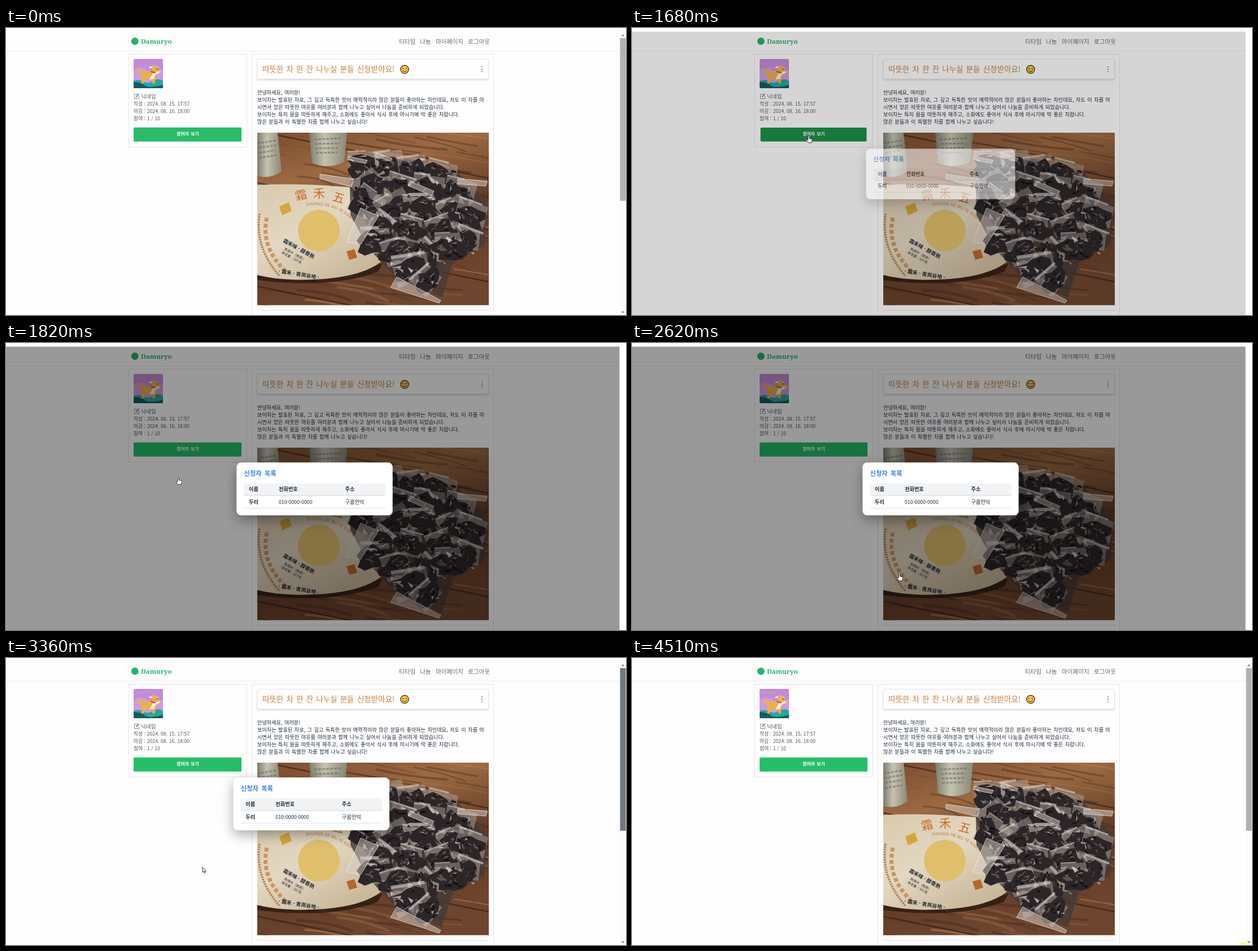
An HTML page that plays this animation: 1098 px wide and 510 px high, repeating every 4.58 s.

```html
<!DOCTYPE html>
<html lang="ko">
<head>
<meta charset="utf-8">
<title>나눔</title>
<style>
  html, body { margin: 0; width: 100%; height: 100%; overflow: hidden; background: #fefefe; }
  svg { display: block; width: 1098px; height: 510px; }
  text { font-family: "Noto Sans CJK KR", "Noto Sans CJK JP", sans-serif; fill: #212934; }
  .nav { font-size: 10.6px; fill: #6b6864; }
  .meta { font-size: 8.7px; word-spacing: .2px; fill: #55575b; }
  .body { font-size: 9.12px; word-spacing: 1px; fill: #1f2a3a; }
  .cell { font-size: 9.2px; }
  .bold { font-weight: 700; }
  .brand { font: 700 11.5px "Noto Serif", serif; fill: #28b16a; }
  .title { font-size: 13.5px; font-weight: 500; word-spacing: 1.4px; fill: #cf9560; stroke: #cf9560; stroke-width: .25px; }
  .label { font-size: 7.9px; font-weight: 700; word-spacing: 1px; fill: #fff; text-anchor: middle; }
  .heading { font-size: 11.3px; font-weight: 700; word-spacing: 2px; fill: #3a82e2; }
  .stamp { font-size: 21px; fill: #c86a2c; }
  .box { fill: #fefefe; stroke: #e6e6e6; }
  .raised { filter: drop-shadow(0 2px 1.5px #0002); }
  .floating { filter: drop-shadow(0 8px 11px #0005); }
  #press { transform-origin: 322px 189px; }
</style>
</head>
<body>
<svg viewBox="0 0 1098 510">
  <defs>
    <clipPath id="frame"><rect x="445" y="186" width="410" height="306.5"/></clipPath>
    <clipPath id="portrait"><rect x="226" y="55" width="52" height="52" rx="2"/></clipPath>
    <linearGradient id="wood" x2=".35" y2="1">
      <stop stop-color="#7a4c30"/><stop offset=".3" stop-color="#9c6a42"/>
      <stop offset=".65" stop-color="#5f3a27"/><stop offset="1" stop-color="#6e452e"/>
    </linearGradient>
    <linearGradient id="tin">
      <stop stop-color="#7c7d70"/><stop offset=".4" stop-color="#c6c2b0"/><stop offset="1" stop-color="#8a8776"/>
    </linearGradient>
    <linearGradient id="paper" x2=".7" y2="1">
      <stop stop-color="#d9c9ac"/><stop offset=".5" stop-color="#e3d7c2"/><stop offset="1" stop-color="#c9b799"/>
    </linearGradient>
    <path id="arc" d="M531 316Q588 308 627 357"/>
  </defs>

  <rect width="1098" height="510" fill="#fefefe"/>
  <path d="M0 41H1087" stroke="#ececec"/>
  <circle cx="228.3" cy="23.5" r="6.5" fill="#28b16a"/>
  <text class="brand" x="239" y="27.8">Damuryo</text>
  <text class="nav" x="696" y="27.6">티타임</text>
  <text class="nav" x="733" y="27.6">나눔</text>
  <text class="nav" x="761" y="27.6">마이페이지</text>
  <text class="nav" x="818" y="27.6">로그아웃</text>

  <rect class="box" x="217" y="46.5" width="209.5" height="165"/>
  <g clip-path="url(#portrait)">
    <path d="M226 55h52v52h-52z" fill="#c48bd8"/>
    <path d="M226 74q14-7 25 1t27-3v30h-52z" fill="#d09be0"/>
    <path d="M253 71q2-4 5-2 3-5 7 0 5-1 5 2z" fill="#fff"/>
    <path d="M226 94q9-4 17 1t18-1 17 0v14h-52z" fill="#2aa79b"/>
    <path d="M226 96q14 0 20 6t32-1v7h-52z" fill="#155969"/>
    <g transform="translate(249 88)scale(1.2)translate(-249 -88)">
      <path d="M240 82q-7-1-4-8 3 3 7 5l13-1 2-9 4 3 3-2 1 6 5 2-3 4-4 1-2 6-1 8h-3l-1-6-9-1-4 7h-3l1-8z" fill="#eab04a"/>
      <path d="M258 82l7-3h5l-3 3-5 2-2 6-7 1z" fill="#fff1d4"/>
      <path d="M255 79l7 2" stroke="#d1484a" stroke-width="2"/>
      <circle cx="264.5" cy="75.5" r=".8" fill="#333"/>
    </g>
  </g>
  <path d="M233 117.5h-5.5v8h8v-4.5" fill="none" stroke="#8a9199"/>
  <path d="M230.5 122.5l5-5.5" stroke="#6f8fb4" stroke-width="2"/>
  <text class="meta" x="239" y="125" style="font-size:9.6px">닉네임</text>
  <text class="meta" x="226" y="138">작성 : 2024. 08. 15. 17:57</text>
  <text class="meta" x="226" y="151">마감 : 2024. 08. 16. 18:00</text>
  <text class="meta" x="226" y="164">참여 : 1 / 10</text>
  <g id="press">
    <rect x="226" y="176.7" width="191" height="25" rx="1.5" fill="#26bd69"/>
    <rect id="hover" x="226" y="176.7" width="191" height="25" rx="1.5" fill="#1a9147"/>
    <text class="label" x="322" y="191.3">참여자 보기</text>
  </g>

  <rect class="box" x="435.5" y="46.5" width="428" height="480"/>
  <rect class="box raised" x="445" y="55.5" width="409.5" height="35" rx="2"/>
  <text class="title" x="454" y="78.3">따뜻한 차 한 잔 나누실 분들 신청받아요!</text>
  <g fill="none" stroke="#292520" stroke-linecap="round">
    <circle cx="706" cy="73.5" r="7.2" fill="#fbc743" stroke-width="1.2"/>
    <path d="M701.5 72.5q1.5-2.500 3 0m3 0q1.5-2.500 3 0M702 75.5q4 4.500 8 0"/>
  </g>
  <path d="M843 69v0m0 4.2v0m0 4.2v0" stroke="#888" stroke-width="2.2" stroke-linecap="round"/>
  <text class="body" x="445" y="118">안녕하세요, 여러분!</text>
  <text class="body" x="445" y="131">보이차는 발효된 차로, 그 깊고 독특한 맛이 매력적이라 많은 분들이 좋아하는 차인데요, 저도 이 차를 마</text>
  <text class="body" x="445" y="144">시면서 얻은 따뜻한 여유를 여러분과 함께 나누고 싶어서 나눔을 준비하게 되었습니다.</text>
  <text class="body" x="445" y="157">보이차는 특히 몸을 따뜻하게 해주고, 소화에도 좋아서 식사 후에 마시기에 딱 좋은 차랍니다.</text>
  <text class="body" x="445" y="170">많은 분들과 이 특별한 차를 함께 나누고 싶습니다!</text>

  <g clip-path="url(#frame)">
    <path d="M445 186h410v307H445z" fill="url(#wood)"/>
    <g id="grain" fill="none"></g>
    <path d="M445 186h36l7 69q-20 14-43 8z" fill="url(#tin)"/>
    <path d="M537 186h67l-5 52q-28 14-57 2z" fill="url(#tin)"/>
    <path d="M445 205l33-5m-31 13l32-5m-31 14l30-5m-30 14l31-5M546 198l47-2m-46 10l44-1m-43 9l42-1m-41 9l38-1" stroke="#66695d" stroke-width="3" stroke-dasharray="5 2" opacity=".55"/>
    <path d="M445 430q110 30 222-12l-8 15q-80 31-214 15z" fill="#2b1a11" opacity=".8"/>
    <path d="M445 279q70-4 164 4l14 42q30 40 40 91-30 24-100 30-70 5-118-7z" fill="url(#paper)"/>
    <circle cx="554" cy="360" r="37" fill="#dfbf6c"/>
    <path d="M484 317l17-7 5 15-17 8z" fill="#d6a63d"/>
    <path d="M603 397l14-4 5 15-14 4z" fill="#b8662f"/>
    <path d="M462 337Q450 390 497 434" fill="none" stroke="#cb9560" stroke-width="7" stroke-dasharray="7 4"/>
    <path d="M449 330Q440 390 484 440" fill="none" stroke="#b68452" stroke-width="4" stroke-dasharray="3 1.5"/>
    <text class="stamp" transform="translate(514 307)rotate(-14)">霜</text>
    <text class="stamp" transform="translate(544 301)">禾</text>
    <text class="stamp" transform="translate(577 306)rotate(16)">五</text>
    <text font-size="7.5" style="fill:#b98042"><textPath href="#arc">SHUANG HE WU YE XIAN CHA</textPath></text>
    <text class="bold" transform="translate(490 380)rotate(29)" font-size="9">霜禾味 · 醇香熟</text>
    <text transform="translate(492 394)rotate(29)" font-size="6">熟茶叶（熟茶）</text>
    <text transform="translate(487 400)rotate(29)" font-size="6">净含量：357克</text>
    <text class="bold" transform="translate(482 435)rotate(9)" font-size="9">· 霜禾 · 青岚谷地 ·</text>
    <path d="M608 240l55-14 75 10 62 20 52 60-5 70-55 30-20 62-70-24-60-62-32-60z" fill="#443a37" opacity=".8"/>
    <g id="bags"></g>
    <g fill="#d8d0c8" fill-opacity=".5" stroke="#f2eeea" stroke-opacity=".7">
      <path d="M628 320l32 14-32 51-25-5zM692 442l78 42-3 5-86-28zM556 260l60 8-4 14-56-14z"/>
      <path d="M606 228l34 7-3 6-33-7zM656 222l28 10-3 5-28-9zM716 272l42 18-4 8-42-18zM800 268l52 4-2 9-50-4z"/>
    </g>
  </g>
  <path d="M445 501.5H855" stroke="#eadfe0"/>

  <g id="scrollbar">
    <rect x="1087" width="11" height="510" fill="#fbfbfb"/>
    <rect id="thumb" x="1087.5" y="18" width="10" height="289"/>
    <path d="M1089.5 14.5l3-3.5 3 3.5zM1089.5 503.5l3 3.5 3-3.5z" fill="#8b8b8b"/>
  </g>
  <rect id="shade" y="6.5" width="1086.5" height="504"/>

  <g id="modal">
    <rect class="floating" x="408.3" y="212.3" width="276.4" height="94" rx="8" fill="#fff"/>
    <text class="heading" x="421.5" y="236.2">신청자 목록</text>
    <path d="M422 249.5h250v21h-250z" fill="#f1f3f5"/>
    <path d="M422 271h250" stroke="#cfd4da"/>
    <path d="M422 293.5h250" stroke="#dee2e6"/>
    <text class="cell bold" x="430" y="263.2">이름</text>
    <text class="cell bold" x="483" y="263.2">전화번호</text>
    <text class="cell bold" x="600.5" y="263.2">주소</text>
    <text class="cell bold" x="430" y="285.5">두리</text>
    <text class="cell" x="483" y="285.5" style="font-size:8.75px">010-0000-0000</text>
    <text class="cell" x="600.5" y="285.5">구름언덕</text>
  </g>

  <g id="pointer">
    <circle id="click" r="9" fill="#ff0" opacity=".6"/>
    <g fill="#fff" stroke="#222" stroke-width=".9" stroke-linejoin="round">
      <path id="hand" d="M-1.2 1q1.2-2 2.4 0v4l4 .8q1.2.5.9 2.7l-1.2 4H-.8L-4.4 8q0-2 3.2 0z"/>
      <path id="arrow" d="M0 0v9l2-1.8 1.5 3.3 1.5-.7-1.4-3h2.8z"/>
    </g>
  </g>
</svg>
<script>
const $ = id => document.getElementById(id);

let seed = 11;
const rand = (a, b) => {
  seed = seed * 16807 % 2147483647;
  return a + (b - a) * seed / 2147483647;
};
const times = (n, make) => Array.from({ length: n }, (_, i) => make(i)).join('');

$('grain').innerHTML = times(110, i => {
  const y = rand(160, 500), x = rand(420, 800);
  return `<path d="M${x} ${y}q60 ${rand(2, 14)} ${rand(70, 150)} ${rand(10, 30)}"
    stroke="${i % 3 ? '#3d2417' : '#c08a58'}" stroke-width="${rand(.6, 5)}" opacity="${rand(.12, .45)}"/>`;
}) + times(4, i => `<path d="M430 ${180 + i * 92}l440 90" stroke="#2e1a10" stroke-width="2.5" opacity=".6"/>`);

// A clear zip bag holding a dark lump of tea
function bag(x, y) {
  const lump = times(15, i => {
    const angle = i / 15 * Math.PI * 2, r = rand(17, 33);
    return `${Math.cos(angle) * r * 1.15},${Math.sin(angle) * r * .8 + 2} `;
  });
  const crumbs = times(16, i => `<path d="M${rand(-24, 18)} ${rand(-16, 18)}l${rand(2, 9)} ${rand(-6, 6)}"
    stroke="${i % 2 ? '#5d5350' : '#171214'}" stroke-width="${rand(1, 4)}"/>`);
  const shine = times(6, () => `<path d="M${rand(-30, 22)} ${rand(-24, 22)}l${rand(4, 16)} ${rand(-9, 9)} ${rand(-9, 3)} ${rand(1, 6)}z"
    fill="#e4dfdc" opacity="${rand(.25, .75)}"/>`);
  return `<g transform="translate(${x} ${y})rotate(${rand(-40, 50)})scale(${rand(.85, 1.15)})">
    <path d="M-27-24L${rand(16, 30)}-27 30 ${rand(8, 24)} -22 26z" fill="#b5aaa4" opacity=".45"/>
    <polygon points="${lump}" fill="#2c2628"/>${crumbs}${shine}
    <path d="M-27-25L${rand(0, 28)}-27" stroke="#d6d0cc" stroke-width="${rand(1, 6)}" opacity=".65"/></g>`;
}
const bagSpots = [632,246, 680,245, 722,255, 768,264, 645,282, 695,284, 745,288, 800,294,
  638,314, 688,322, 740,322, 790,325, 820,335, 664,352, 715,358, 770,358, 815,378,
  654,382, 690,398, 740,402, 785,390, 715,432, 745,450];
$('bags').innerHTML = times(bagSpots.length / 2, i => bag(bagSpots[2 * i], bagSpots[2 * i + 1]));

// time, x, y of the pointer tip
const route = [
  [590, 1040, 470], [800, 620, 300], [1000, 350, 205], [1140, 315, 190], [1480, 314, 191],
  [1680, 313, 191], [1820, 305, 238], [1950, 348, 336], [2160, 474, 410], [2620, 474, 410],
  [2900, 346, 372], [3360, 346.5, 371.5], [3500, 560, 400], [3700, 960, 470], [3820, 1066, 492],
  [4240, 1082, 514], [4580, 1082, 514]
];
const LOOP = 4580, OPEN = 1570, CLOSE = 3360;
const mix = (a, b, p) => a + (b - a) * p;

function tip(t) {
  const i = Math.max(1, route.findIndex(stop => stop[0] > t));
  const [t0, x0, y0] = route[i - 1], [t1, x1, y1] = route[i];
  const p = (t - t0) / (t1 - t0);
  return [mix(x0, x1, p), mix(y0, y1, p)];
}

function draw(t) {
  const ramp = (a, b) => Math.min(1, Math.max(0, (t - a) / (b - a)));
  const during = (a, b) => t >= a && t < b;
  const show = (id, visible) => $(id).style.display = visible ? '' : 'none';

  $('hover').style.opacity = ramp(1000, 1140) - ramp(1740, 1820);
  $('press').style.transform = `scale(${during(1480, 1750) ? .982 : 1})`;

  const dark = ramp(620, 820) - ramp(3890, 4200);
  $('thumb').style.fill = `rgb(${mix(175, 114, dark)},${mix(176, 120, dark)},${mix(181, 129, dark)})`;
  show('scrollbar', !during(OPEN, CLOSE));

  $('shade').style.opacity = t < CLOSE ? .4 * ramp(1600, 1800) : 0;
  const open = ramp(OPEN, OPEN + 200) - ramp(CLOSE + 50, CLOSE + 250);
  const shift = t < CLOSE ? 0 : -5.7, scale = .9 + .1 * open;
  $('modal').style.opacity = open;
  $('modal').setAttribute('transform', `translate(${546.5 + shift} 259.3)scale(${scale})translate(-546.5 -259.3)`);

  show('pointer', t >= 590);
  $('pointer').setAttribute('transform', `translate(${tip(t)})`);
  const pointing = during(1050, CLOSE);
  show('hand', pointing);
  show('arrow', !pointing);
  show('click', during(1480, 1620) || during(3210, CLOSE) || t >= 4510);
}

function tick() {
  draw(performance.now() % LOOP);
  requestAnimationFrame(tick);
}
tick();
</script>
</body>
</html>
```
